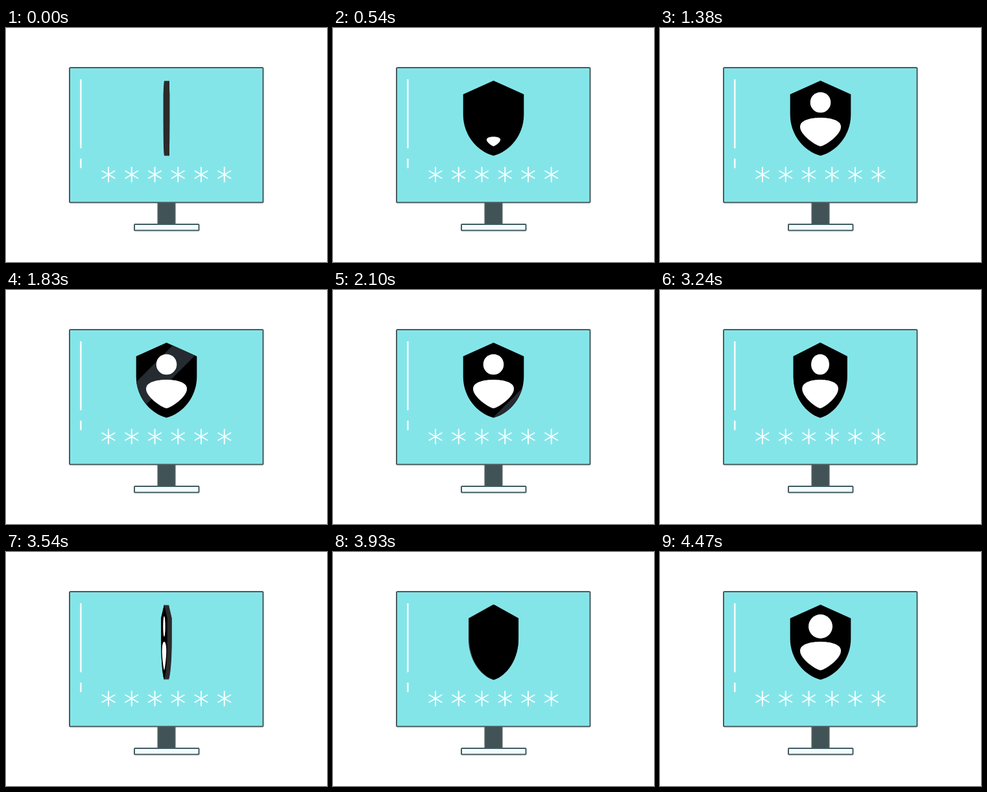
An HTML page with a canvas that plays this animation: 495 px wide and 360 px high, repeating every 4500 ms.

```html
<!DOCTYPE html>
<html lang="en">
<head>
<meta charset="utf-8">
<title>Secure login</title>
<style>
html, body { margin: 0; width: 100%; height: 100%; overflow: hidden; background: #fff; }
canvas { display: block; }
</style>
</head>
<body>
<canvas id="stage" width="495" height="360"></canvas>
<script>
const ctx = document.getElementById('stage').getContext('2d');
const LOOP = 4500, STEP = 30, CYCLE = 3570;
const CX = 247.5;
const OUTLINE = '#4b5a5c';

const shield = new Path2D(`M0 81 L46.8 102 V133 C46.8 165 25 190 0 196.5
  C-25 190 -46.8 165 -46.8 133 V102 Z`);
const torso = new Path2D(`M0 182 C-9.5 180 -31.5 164 -31.5 152
  C-31.5 141 -13.5 138 0 138 C13.5 138 31.5 141 31.5 152 C31.5 164 9.5 180 0 182 Z`);

const clamp = x => Math.min(1, Math.max(0, x));
const progress = (t, start, length) => clamp((t - start) / length);
const ease = x => (1 - Math.cos(Math.PI * x)) / 2;

// Grows past full size, then settles.
function pop(t, start) {
  return 1.17 * ease(progress(t, start, 180)) - 0.17 * ease(progress(t, start + 190, 150));
}

function line(x1, y1, x2, y2) {
  ctx.beginPath();
  ctx.moveTo(x1, y1);
  ctx.lineTo(x2, y2);
  ctx.stroke();
}

function box(x, y, w, h, r, fill, stroke) {
  ctx.beginPath();
  ctx.roundRect(x, y, w, h, r);
  ctx.fillStyle = fill;
  ctx.fill();
  ctx.strokeStyle = stroke;
  ctx.stroke();
}

function asterisk(x, y) {
  for (let i = 0; i < 3; i++) {
    const a = Math.PI / 2 + i * Math.PI / 3;
    const dx = 11 * Math.cos(a), dy = 11 * Math.sin(a);
    line(x - dx, y - dy, x + dx, y + dy);
  }
}

function drawMonitor() {
  ctx.lineWidth = 2;
  ctx.lineCap = 'butt';
  box(234.5, 268, 26, 34, 0, '#415356', OUTLINE);
  box(98, 61, 298.5, 207.5, 1.5, '#84e5e9', OUTLINE);
  box(198, 302, 99.5, 9.5, 1, '#f2fbfd', '#425b60');
  ctx.strokeStyle = '#f8ffff';
  ctx.lineWidth = 2.5;
  line(115.3, 79, 115.3, 185);
  line(115.3, 201, 115.3, 215.5);
  ctx.lineWidth = 2;
  ctx.lineCap = 'round';
  for (let i = 0; i < 6; i++) asterisk(158 + i * 35.75, 225.5);
}

// Diagonal highlight sweeping toward the lower right.
function drawShine(t) {
  if (t < 1590 || t > 2140) return;
  const width = 50;
  const near = 443 - CX + (t - 2100) * 0.373, far = near + width;
  ctx.save();
  ctx.clip(shield);
  ctx.beginPath();
  ctx.moveTo(near - 70, 70);
  ctx.lineTo(far - 70, 70);
  ctx.lineTo(far - 210, 210);
  ctx.lineTo(near - 210, 210);
  ctx.fillStyle = '#252b30';
  ctx.fill();
  ctx.restore();
}

function drawUser(t) {
  const body = pop(t, 475), head = pop(t, 720);
  ctx.fillStyle = '#fff';
  if (body > 0) {
    ctx.save();
    ctx.translate(0, 182);
    ctx.scale(body, body);
    ctx.translate(0, -182);
    ctx.fill(torso);
    ctx.restore();
  }
  if (head > 0) {
    ctx.beginPath();
    ctx.arc(0, 114.5, 15.8 * head, 0, 2 * Math.PI);
    ctx.fill();
  }
}

function atOffset(dx, scale, draw) {
  ctx.save();
  ctx.translate(CX + dx, 0);
  ctx.scale(scale, 1);
  draw();
  ctx.restore();
}

function drawShield(t) {
  const opening = t < 1500;
  const turn = opening ? progress(t, 45, 390) : 1 - progress(t, 3195, 385);
  const scale = Math.max(turn, 0.02);
  const depth = 4 * (1 - turn);
  const edgeOn = turn < 0.05;

  if (depth > 0) {
    ctx.fillStyle = '#2c2b2b';
    for (let dx = -depth; dx <= depth; dx += 0.5) {
      atOffset(dx, scale, () => ctx.fill(shield));
    }
    if (edgeOn) ctx.fillRect(CX - 3.5, 81.5, 8, 115);
  }
  if (edgeOn) return;
  atOffset(opening ? depth : -depth, scale, () => {
    ctx.fillStyle = '#000';
    ctx.fill(shield);
    drawShine(t);
    drawUser(t);
  });
}

function render(now) {
  const t = Math.floor((now % LOOP) / STEP) * STEP;
  ctx.fillStyle = '#fff';
  ctx.fillRect(0, 0, 495, 360);
  drawMonitor();
  drawShield(t % CYCLE);
  requestAnimationFrame(() => render(performance.now() - begin));
}

const begin = performance.now();
render(0);
</script>
</body>
</html>
```
